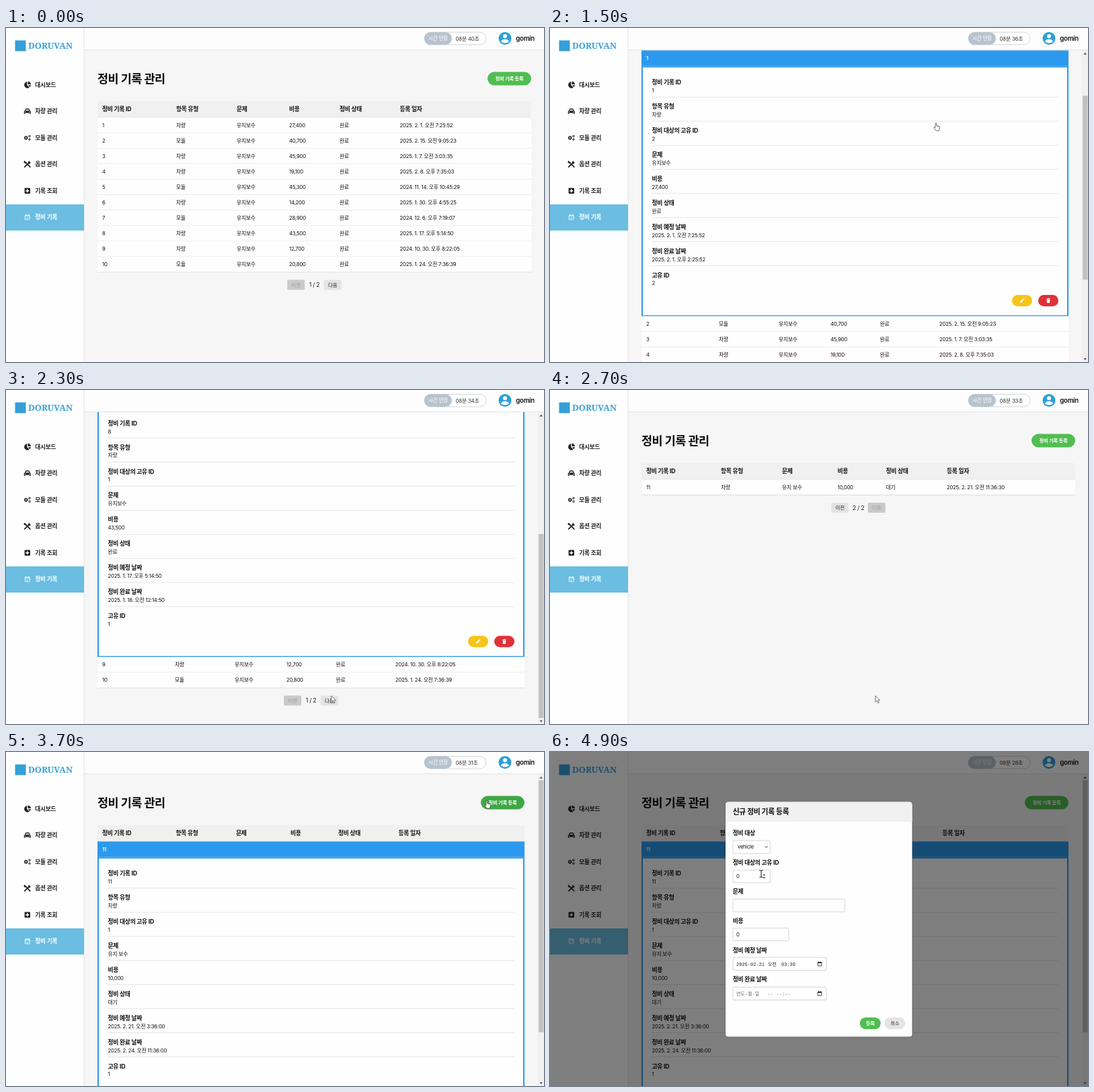
Animation of 800x498 px, one loop 5 s. Source, as an HTML page:

```html
<!DOCTYPE html>
<html lang="ko">
<head>
<meta charset="utf-8">
<title>정비 기록 관리</title>
<style>
  html, body { margin: 0; width: 100%; height: 100%; overflow: hidden; background: #f6f6f6; }
  svg { display: block; width: 100vw; height: 100vh; }
  text { font-family: Inter, "Noto Sans CJK KR", sans-serif; letter-spacing: -.03em; white-space: pre; }
  .mono { font-family: "Liberation Mono", "Noto Sans CJK KR", monospace; letter-spacing: 0; }
  .mark { font-family: "Noto Serif", serif; letter-spacing: 0; }
</style>
</head>
<body>
<svg id="stage" viewBox="0 0 800 498" xmlns="http://www.w3.org/2000/svg">
  <defs><clipPath id="view"><rect x="116" y="33" width="684" height="465"/></clipPath></defs>
  <rect width="800" height="498" fill="#f6f6f6"/>
  <g id="page" clip-path="url(#view)"></g>
  <g id="bar"></g>
  <g id="chrome"></g>
  <g id="clock"></g>
  <g id="modal"></g>
  <g id="cursor"></g>
</svg>
<script>
const LOOP = 5000, STEP = 100;
const BLUE = '#2b99ed', GREEN = '#50be50', INK = '#111';
const $ = id => document.getElementById(id);

// Drawing helpers; text is centred vertically on y.
const text = (x, y, s, size = 7.8, fill = INK, weight = 400, extra = '') =>
  `<text x="${x}" y="${y + size * .36}" font-size="${size}" fill="${fill}" font-weight="${weight}" ${extra}>${s}</text>`;
const mid = (x, y, s, size, fill, weight) => text(x, y, s, size, fill, weight, 'text-anchor="middle"');
const bold = (x, y, s, size = 8.8, fill = INK) => text(x, y, s, size, fill, 700);
const mono = (x, y, s, fill) => text(x, y, s, 7, fill, 400, 'class="mono"');
const rect = (x, y, w, h, fill, r = 0, extra = '') =>
  `<rect x="${x}" y="${y}" width="${w}" height="${h}" rx="${r}" fill="${fill}" ${extra}/>`;
const path = (d, fill = 'none', extra = '') => `<path d="${d}" fill="${fill}" ${extra}/>`;
const line = (x1, x2, y, color) => path(`M${x1} ${y}H${x2}`, 'none', `stroke="${color}" stroke-width=".8"`);
const at = (x, y, body) => `<g transform="translate(${x} ${y})">${body}</g>`;

// Piecewise linear track: keys are [time, value, ...].
function track(keys, t) {
  let i = 0;
  while (i < keys.length - 2 && t >= keys[i + 1][0]) i++;
  const a = keys[i], b = keys[i + 1];
  const k = Math.min(1, Math.max(0, (t - a[0]) / (b[0] - a[0])));
  return a.slice(1).map((v, j) => v + (b[j + 1] - v) * k);
}

const HEADS = ['정비 기록 ID', '항목 유형', '문제', '비용', '정비 상태', '등록 일자'];
const FIELDS = ['정비 기록 ID', '항목 유형', '정비 대상의 고유 ID', '문제', '비용', '정비 상태',
  '정비 예정 날짜', '정비 완료 날짜', '고유 ID'];
const row = (id, kind, cost, date) => [id, kind, '유지보수', cost, '완료', date];
const PAGES = [
  [
    row(1, '차량', '27,400', '2025. 2. 1. 오전 7:25:52'),
    row(2, '모듈', '40,700', '2025. 2. 15. 오전 9:05:23'),
    row(3, '차량', '45,900', '2025. 1. 7. 오전 3:03:35'),
    row(4, '차량', '19,100', '2025. 2. 8. 오후 7:35:03'),
    row(5, '모듈', '45,300', '2024. 11. 14. 오후 10:45:29'),
    row(6, '차량', '14,200', '2025. 1. 30. 오후 4:55:25'),
    row(7, '모듈', '28,900', '2024. 12. 6. 오후 7:19:07'),
    row(8, '차량', '43,500', '2025. 1. 17. 오후 5:14:50'),
    row(9, '차량', '12,700', '2024. 10. 30. 오후 8:22:05'),
    row(10, '모듈', '20,800', '2025. 1. 24. 오전 7:36:39')
  ],
  [[11, '차량', '유지 보수', '10,000', '대기', '2025. 2. 21. 오전 11:36:30']]
];
// Target id, planned date, finished date.
const DETAILS = {
  1: [2, '2025. 2. 1. 오전 7:25:52', '2025. 2. 1. 오후 2:25:52'],
  8: [1, '2025. 1. 17. 오후 5:14:50', '2025. 1. 18. 오전 12:14:50'],
  11: [1, '2025. 2. 21. 오전 3:36:00', '2025. 2. 24. 오전 11:36:00']
};
const COLS = [
  { wide: [143, 253, 343, 421, 496, 585.5], slim: [143, 251, 340, 417, 490.5, 579] },
  { wide: [143, 254, 345, 427.5, 499.5, 590], slim: [143, 252.5, 342, 423, 494, 583.5] }
];
const ROW_H = 23.06, PANEL_H = 373;

const SCROLL = [[1000, 0], [1100, 3.3], [1300, 150], [1400, 170], [1600, 30], [1700, 0], [1900, 0],
  [2000, 2.2], [2300, 293], [2599, 293], [2600, 0], [3100, 0], [3200, 14.5], [3400, 88], [3500, 60], [3600, 0]];
const MOVES = [[500, 794, 342], [800, 650, 225], [1000, 574, 141.5], [1700, 574, 141.5], [1900, 492, 304],
  [2000, 487, 375], [2300, 483.8, 456], [2700, 483.8, 456], [2900, 351.5, 143], [3500, 351.5, 143],
  [3700, 715, 72.5], [3900, 715, 72.5], [4150, 500, 370], [4400, 315, 184], [4500, 314, 181.5]];

function state(t) {
  const open = t >= 3000 ? 11 : t >= 1900 && t < 2600 ? 8 : t >= 1100 && t < 1700 ? 1 : 0;
  const kind = t < 500 ? '' : t < 2000 ? 'hand' : t < 2400 ? 'arrow' : t < 2700 ? 'hand'
    : t < 2800 ? 'arrow' : t < 3900 ? 'hand' : t < 4300 ? 'arrow' : 'beam';
  return {
    open, kind,
    page: t >= 2600 ? 1 : 0,
    scroll: open ? track(SCROLL, t)[0] : 0,
    pos: track(MOVES, t),
    modal: t >= 3900,
    hover: t >= 3700 && t < 3900,
    left: Math.floor(40.3 - t * .00245)
  };
}

function panel(data, top, right) {
  const [target, planned, done] = DETAILS[data[0]];
  const values = [data[0], data[1], target, data[2], data[3], data[4], planned, done, target];
  let out = rect(136, top, right - 136, ROW_H + 1, BLUE) + text(143, top + 11.6, data[0], 7.8, '#fff', 600);
  const y = top + ROW_H + .4;
  out += rect(137, y + .8, right - 138, PANEL_H - 1.5, '#fefefe', 0, `stroke="${BLUE}" stroke-width="2"`);
  out += path(`M137 ${y - .2}H${right}`, 'none', 'stroke="#a9d0f0" stroke-width=".8" stroke-dasharray="1 1"');
  FIELDS.forEach((name, i) => {
    const fy = top + 47.6 + i * 35.92;
    out += bold(151.5, fy, name) + text(151.5, fy + 12.2, values[i]);
    if (i < 8) out += line(151, right - 15, fy + 22, '#dcdde4');
  });
  const by = top + 373;
  out += rect(right - 84, by - 8.5, 30, 17, '#f5c518', 8.5) + rect(right - 45, by - 8.5, 30, 17, '#e03137', 8.5);
  out += at(right - 69, by, path('M-3.3 3.3l.5-2 3.9-3.9 1.5 1.5-3.9 3.9zM1.6-3.1l.7-.7 1.5 1.5-.7.7z', '#fff'));
  out += at(right - 30, by, path('M-2.8-3h1.7l.4-.7h1.4l.4.7h1.7v1h-5.6zM-2.4-1.4h4.8l-.4 5h-4z', '#fff'));
  return out;
}

function pager(cx, y, page) {
  const button = (x, s, on) => rect(x, y - 7.5, 26, 15, on ? '#e3e3e3' : '#cacaca', 2) +
    mid(x + 13, y, s, 7.4, on ? '#222' : '#999', on ? 500 : 400);
  return button(cx - 40.3, '이전', page) + mid(cx, y, `${page + 1} / 2`, 8.8, '#222', 400) +
    button(cx + 14.2, '다음', !page);
}

function drawPage(s) {
  const right = s.open ? 771 : 781;
  const cols = COLS[s.page][s.open ? 'slim' : 'wide'];
  let out = bold(136, 75.5, '정비 기록 관리', 17.5, '#0b0b0b');
  out += rect(right - 65, 65.5, 65, 20, s.hover ? '#3fa845' : GREEN, 10);
  out += mid(right - 32.5, 75.5, '정비 기록 등록', 7.3, '#fff', 600);
  out += rect(136, 109, right - 136, 24.5, '#f0f0f0');
  HEADS.forEach((h, i) => out += bold(cols[i], 121, h));
  out += line(136, right, 133.3, '#d9d9d9');
  let y = 133.5;
  for (const data of PAGES[s.page]) {
    if (data[0] === s.open) {
      out += panel(data, y, right);
      y += PANEL_H;
    } else {
      out += rect(136, y, right - 136, ROW_H, '#fefefe');
      data.forEach((v, i) => out += text(cols[i], y + 11.5, v));
      out += line(136, right, y + ROW_H, '#d9d9d9');
    }
    y += ROW_H;
  }
  return at(0, -s.scroll, out + pager((136 + right) / 2, y + 19, s.page));
}

function drawBar(s) {
  if (!s.open) return '';
  const total = s.page ? 553 : 758, k = 447 / total;
  return rect(791, 33, 9, 465, '#f0f0f0') + rect(792, 42 + s.scroll * k, 7.5, 465 * k, '#c1c1c1') +
    path('M793.3 39.4l2.4-2.8 2.4 2.8z', '#555') + path('M793.3 492.5l2.4 2.8 2.4-2.8z', '#555');
}

const gear = (x, y, r) => at(x, y,
  `<circle r="${r * .72}" fill="none" stroke="#222" stroke-width="${r * .6}"/>` +
  `<circle r="${r * 1.05}" fill="none" stroke="#222" stroke-width="${r * .4}" stroke-dasharray="${r * .55}"/>`);
const ICONS = [
  path('M-.6-4.6a4.8 4.8 0 1 0 3.6 8.6L-.6.4z', '#222') + path('M.7-5A4.8 4.8 0 0 1 5.2-.7H.7z', '#222') +
    path('M1 .6h4.2a4.7 4.7 0 0 1-1.4 2.9z', '#222'),
  path('M-5 3.8V.4q0-.9.9-1.2l1-2.3q.4-1 1.4-1h3.4q1 0 1.4 1l1 2.3q.9.3.9 1.2v3.4H3.4V2.6h-6.8v1.2z', '#222') +
    path('M-2.7-1l.8-1.8h3.8l.8 1.8z', '#fefefe') +
    '<circle cx="-3.2" cy="1" r=".7" fill="#fefefe"/><circle cx="3.2" cy="1" r=".7" fill="#fefefe"/>',
  gear(-2.1, 0, 2.5) + gear(3.1, -2.4, 1.5) + gear(3.1, 2.5, 1.5),
  path('M-4 4L3-3M-4-4l3 3M1 1l3 3', 'none', 'stroke="#222" stroke-width="1.8" stroke-linecap="round"') +
    path('M1.2-2.2l-.1-1.6 2-1.3.3 1.8 1.6.2-1 2.2-1.6.2z', '#222') +
    path('M-4.9-4.9l2 .7.6 1.8-1.2 1.1-1.7-1.2z', '#222'),
  rect(-4.2, -4.2, 8.4, 8.4, '#222', 1) + path('M0-2.5v5M-2.5 0h5', 'none', 'stroke="#fff" stroke-width="1.5"'),
  rect(-3.5, -3.2, 7, 6.8, 'none', .6, 'stroke="#fff" stroke-width=".9"') +
    path('M-3.5-2h7M-2-4.4v1.3M2-4.4v1.3M-1.7.9l1.2 1.2 2.3-2.4', 'none', 'stroke="#fff" stroke-width=".9"')
];
const MENU = ['대시보드', '차량 관리', '모듈 관리', '옵션 관리', '기록 조회', '정비 기록'];

function drawChrome() {
  let out = rect(116, 0, 684, 32.5, '#fdfdfd') + line(116, 800, 32.6, '#dcdcdc');
  out += rect(0, 0, 116, 498, '#fefefe') + path('M116 0V498', 'none', 'stroke="#dedede" stroke-width=".8"');
  out += rect(0, 263, 116, 39, '#6bbde2');
  out += rect(13.5, 18.5, 16, 16, '#359fd8');
  out += text(33, 26, 'DORUVAN', 12.8, '#359fd8', 700, 'class="mark"');
  MENU.forEach((name, i) => {
    const y = 84.7 + i * 39.5;
    out += at(31.8, y, ICONS[i]) + text(43.3, y, name, 8.7, i === 5 ? '#fff' : '#222', 600);
  });
  out += rect(622, 6.3, 92, 18.6, '#fff', 9.3, 'stroke="#cfd3d6" stroke-width=".9"');
  out += rect(622, 6.3, 41, 18.6, '#b7c3ce', 9.3) + mid(642.5, 15.7, '시간 연장', 7.7, '#fff', 500);
  out += '<circle cx="742" cy="15.5" r="9.5" fill="#2e9fd9"/><circle cx="742" cy="12.3" r="3" fill="#fff"/>';
  out += path('M736 20.3q1.2-3.6 6-3.6t6 3.6q-2.4 2.2-6 2.2t-6-2.2z', '#fff');
  return out + text(758.3, 15.7, 'gomin', 9.7, '#111', 600);
}

function drawModal() {
  const box = (y, w, h = 18.8) => rect(272, y, w, h, '#fff', 2, 'stroke="#c9c9c9" stroke-width=".8"');
  const calendar = y => at(401, y, rect(-2.8, -2.5, 5.6, 5.4, 'none', .5, 'stroke="#111" stroke-width=".8"') +
    path('M-2.8-1.9h5.6M-1.7-3.6v1M1.7-3.6v1', 'none', 'stroke="#111" stroke-width="1.1"'));
  let out = rect(0, 0, 800, 498, '#000', 0, 'fill-opacity=".5"');
  out += rect(260, 74, 279.5, 351.5, '#000', 5, 'fill-opacity=".2"');
  out += rect(261, 74.5, 277.5, 350, '#fefefe', 4);
  out += path('M261 104V78.5q0-4 4-4h269.500q4 0 4 4V104z', '#f1f1f1');
  out += bold(271.7, 89.3, '신규 정비 기록 등록', 10.8);
  ['정비 대상', '정비 대상의 고유 ID', '문제', '비용', '정비 예정 날짜', '정비 완료 날짜']
    .forEach((name, i) => out += bold(271.7, 120.7 + i * 43.7, name));
  out += box(132, 55.3, 19.3) + text(279, 141.7, 'vehicle', 7.6);
  out += path('M319.600 140.500l2.100 2.100 2.100-2.100', 'none', 'stroke="#222" stroke-width=".9"');
  out += box(176, 55.3) + text(277, 185.5, '0');
  out += path('M316.300 184l2-2.300 2 2.300zM316.300 186.600l2 2.300 2-2.300z', '#555');
  out += box(219.4, 166.500) + box(262.600, 83) + text(277, 272, '0');
  out += box(306.200, 138.800, 19.200) + mono(277, 316, '2025-02-21', '#222') +
    mono(324, 316, '오전', '#222') + mono(344, 316, '03:39', '#222') + calendar(316);
  out += box(350.600, 138.800, 19.200) + mono(277, 360.300, '연도-월-일', '#666') +
    mono(323, 360.300, '--', '#666') + mono(336.500, 360.300, '--:--', '#666') + calendar(360.300);
  out += rect(460.700, 395.700, 31, 17.500, GREEN, 8.700) + mid(476.200, 404.500, '등록', 7.300, '#fff', 700);
  return out + rect(497.200, 395.700, 31, 17.500, '#e4e4e4', 8.700) + mid(512.700, 404.500, '취소', 7.300, '#333', 400);
}

const CURSORS = {
  '': '',
  arrow: path('M0 0v9.300l2.200-2 1.600 3.500 1.600-.7-1.500-3.400h2.900z', '#fff', 'stroke="#444" stroke-width=".7"'),
  hand: path('M-1 .8q0-.9.9-.9t.9.900v3.400q2.800-.2 4.400 1.100.5.400.4 1.300l-.7 3.100-.6 1.900h-4.300q-.9-1.900-2.900-4-.700-1.200.2-1.400.9 0 1.700 1z',
    '#fff', 'stroke="#333" stroke-width=".7"') + path('M2 4.400v2M3.700 4.800v1.800', 'none', 'stroke="#666" stroke-width=".5"'),
  beam: path('M-2.600-5q2 0 2.600.8.600-.8 2.600-.8M0-4.200v8.800M-2.600 5.400q2 0 2.600-.8.600.8 2.600.8', 'none',
    'stroke="#111" stroke-width="1"')
};

function draw(t) {
  const s = state(t);
  $('page').innerHTML = drawPage(s);
  $('bar').innerHTML = drawBar(s);
  $('clock').innerHTML = text(668.500, 15.700, `08분 ${s.left}초`, 7.900, '#333');
  $('modal').innerHTML = s.modal ? drawModal() : '';
  $('cursor').innerHTML = at(s.pos[0], s.pos[1], CURSORS[s.kind]);
}

$('chrome').innerHTML = drawChrome();
const start = performance.now();
let shown = -1;
function tick() {
  const t = Math.floor((performance.now() - start) % LOOP / STEP) * STEP;
  if (t !== shown) draw(shown = t);
  requestAnimationFrame(tick);
}
tick();
</script>
</body>
</html>
```
